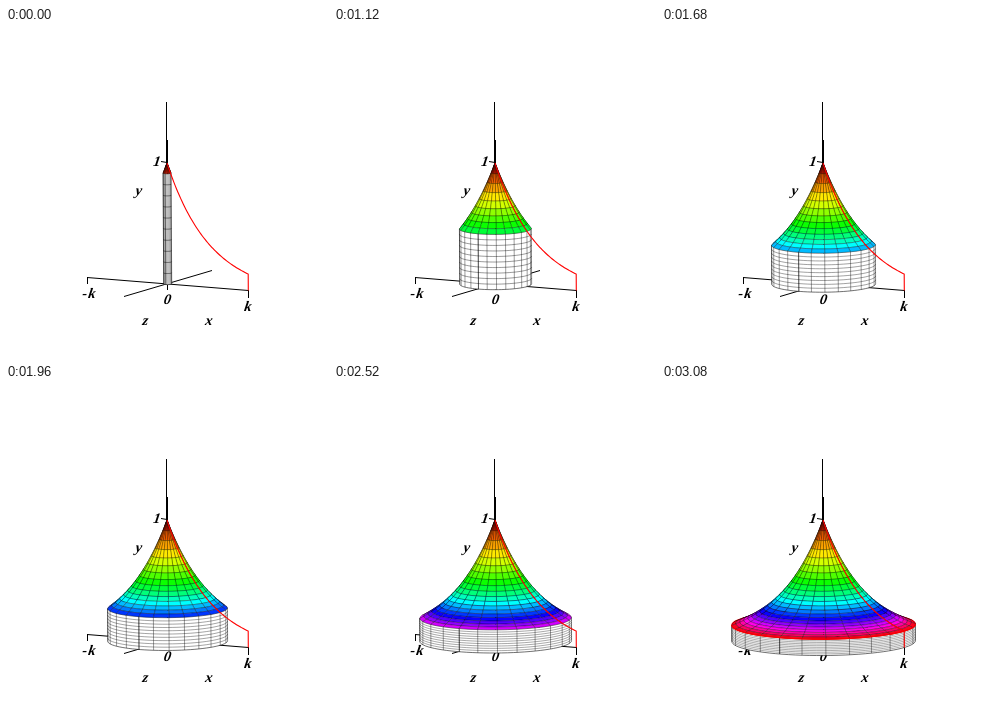
An HTML page with a canvas for the animation above (3.22 s loop, 322x329 px).

```html
<!DOCTYPE html>
<html lang="en">
<head>
<meta charset="utf-8">
<title>Surface of revolution</title>
<style>
  html, body { margin: 0; width: 100%; height: 100%; overflow: hidden; background: #fff; }
  canvas { display: block; width: 322px; height: 329px; }
</style>
</head>
<body>
<canvas id="stage" width="322" height="329"></canvas>
<script>
const ctx = document.getElementById('stage').getContext('2d');
const STEPS = 23, HOLD = 140;
const SECTORS = 24, ROWS = 10;
const TAU = 2 * Math.PI;

const height = r => Math.exp(-2 * r);

// Parallel projection; x and z are in units of k, z points to the viewer.
const project = (x, y, z) => [
  161.7 + 80.6 * x - 44 * z - 0.7 * y,
  256 + 6.5 * x + 13 * z - 121 * y
];
const polar = (r, a, y) => project(r * Math.cos(a), y, r * Math.sin(a));
const onCap = (r, a) => polar(r, a, height(r));
const toward = a => 6.5 * Math.cos(a) + 13 * Math.sin(a);

// Angles where the silhouette splits front from back.
const RIGHT = -Math.atan2(44, 80.6), LEFT = RIGHT + Math.PI;

function trace(points, close) {
  ctx.beginPath();
  points.forEach(p => ctx.lineTo(p[0], p[1]));
  if (close) ctx.closePath();
}

function line(points, color, width = 1) {
  trace(points);
  ctx.strokeStyle = color;
  ctx.lineWidth = width;
  ctx.stroke();
}

function sample(n, from, to, fn) {
  return Array.from({ length: n + 1 }, (_, i) => fn(from + (to - from) * i / n));
}

function label(text, x, y) {
  ctx.save();
  ctx.transform(1, 0, -0.15, 1, x - 0.7, y);
  ctx.fillText(text, 0, 0);
  ctx.restore();
}

function drawAxes() {
  const black = points => line(points, '#000');
  black([[81, 249.5], [242.5, 262.5]]);
  black([[118, 268.5], [206, 242.5]]);
  black([[160.5, 74], [160.5, 135]]);
  black([[161.5, 112], [161.5, 256]]);
  black([[81.5, 249], [81.5, 256]]);
  black([[161.5, 256], [161.5, 262]]);
  black([[242.5, 262], [242.5, 270]]);
  black([[155, 133.5], [161, 134.5]]);

  ctx.font = 'italic bold 14.5px "Liberation Serif", serif';
  ctx.textAlign = 'center';
  ctx.fillStyle = '#000';
  label('1', 151, 138);
  label('y', 133, 167);
  label('-\u200ak', 83, 270);
  label('0', 161.5, 276);
  label('k', 242, 283);
  label('z', 139.5, 297);
  label('x', 203, 297);
}

function drawWall(R) {
  const top = height(R);
  const arc = y => sample(40, RIGHT, LEFT, a => polar(R, a, y));
  trace([...arc(top), ...arc(0).reverse()], true);
  ctx.fillStyle = '#fff';
  ctx.fill();

  const gap = 121 * top / ROWS;
  const rowInk = `rgba(0,0,0,${0.5 + 0.03 * gap})`;
  for (let i = 1; i <= ROWS; i++) line(arc(top * i / ROWS), rowInk, 0.6);
  line(arc(0), 'rgba(0,0,0,.7)', 0.8);

  const column = (a, alpha, width) =>
    line([polar(R, a, 0), polar(R, a, top)], `rgba(0,0,0,${alpha})`, width);
  for (let i = 0; i < SECTORS; i++) {
    const a = i * TAU / SECTORS;
    if (toward(a) > 0) column(a, Math.min(0.65, 0.4 + R), 0.6);
  }
  [Math.PI / 2, LEFT, RIGHT].forEach(a => column(a, 0.6, 0.8));
}

// Each step adds one more band of the same width.
function drawCap(bands) {
  const dr = 1 / STEPS, da = TAU / SECTORS, quads = [];
  for (let i = 0; i < bands; i++) {
    for (let j = 0; j < SECTORS; j++) {
      const r = (i + 0.5) * dr, a = (j + 0.5) * da;
      quads.push({ i, j, r, depth: 6.2 * r * toward(a) + 19 * height(r) });
    }
  }
  quads.sort((p, q) => p.depth - q.depth);
  ctx.lineWidth = 0.55;
  ctx.strokeStyle = 'rgba(0,0,0,.55)';
  for (const { i, j, r } of quads) {
    const r0 = i * dr, r1 = r0 + dr, a0 = j * da, a1 = a0 + da;
    trace([onCap(r0, a0), onCap(r1, a0), onCap(r1, (a0 + a1) / 2),
           onCap(r1, a1), onCap(r0, a1), onCap(r0, (a0 + a1) / 2)], true);
    ctx.fillStyle = `hsl(${360 * r},100%,50%)`;
    ctx.fill();
    ctx.stroke();
  }
}

function drawCurve() {
  line([...sample(60, 0, 1, r => onCap(r, 0)), project(1, 0, 0)], '#f00', 1.1);
}

function draw(step) {
  const bands = step + 1, R = bands / STEPS, full = bands === STEPS;
  const rim = (from, to) =>
    line(sample(80, from, to, a => onCap(1, a)), '#f00', 1.1);
  ctx.fillStyle = '#fff';
  ctx.fillRect(0, 0, 322, 329);
  drawAxes();
  drawWall(R);
  if (full) rim(0, TAU);
  drawCap(bands);
  if (full) rim(RIGHT, LEFT);
  drawCurve();
}

let shown = -1;
const start = performance.now();
function tick() {
  const step = Math.floor((performance.now() - start) / HOLD) % STEPS;
  if (step !== shown) draw(shown = step);
  requestAnimationFrame(tick);
}
tick();
</script>
</body>
</html>
```
